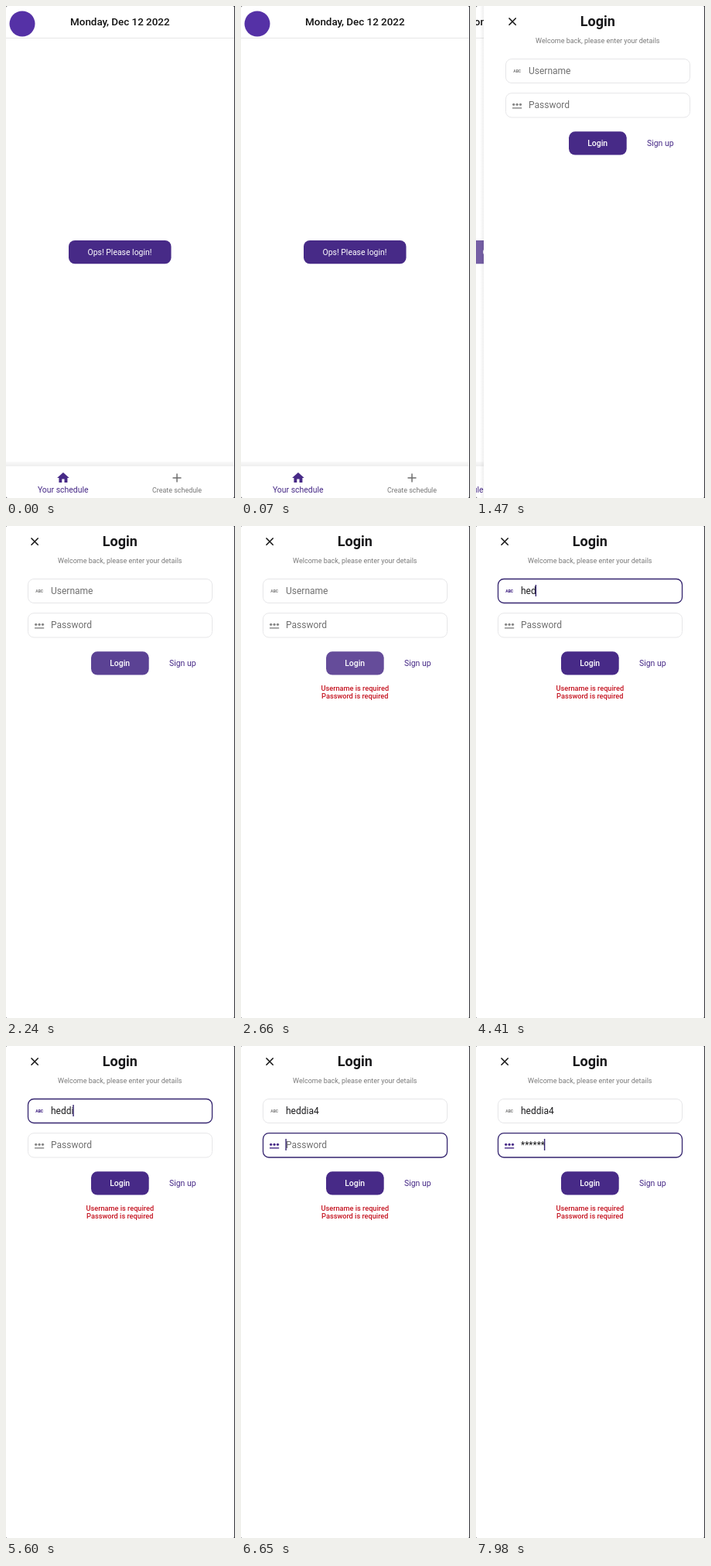
An HTML page for the animation above (8 s loop, 296 px wide and 636 px high).

```html
<!DOCTYPE html>
<html lang="en">
<head>
<meta charset="utf-8">
<title>Login form</title>
<style>
  html, body { margin: 0; width: 100%; height: 100%; overflow: hidden; background: #fff; }
  svg { display: block; width: 296px; height: 636px; }
  text { font-family: Roboto, Arial, sans-serif; }
  .mid { text-anchor: middle; }
  .semi { font-weight: 500; }
  .small { font-size: 10.45px; }
  .hint { font-size: 12px; fill: #707070; }
  .typed { font-size: 12px; fill: #1c1c1e; }
  .error { font-size: 9.2px; font-weight: 500; fill: #c4121f; }
  .box { fill: #fff; }
</style>
</head>
<body>
<svg viewBox="0 0 296 636">
  <defs>
    <linearGradient id="barShade" x2="0" y2="1">
      <stop offset="0" stop-color="#fafafa"/>
      <stop offset="1" stop-color="#eeeeee"/>
    </linearGradient>
    <linearGradient id="sideShade">
      <stop offset="0" stop-color="#000" stop-opacity="0"/>
      <stop offset="1" stop-color="#000" stop-opacity=".06"/>
    </linearGradient>
    <clipPath id="screen"><rect width="295" height="636" rx="2"/></clipPath>
  </defs>
  <rect width="296" height="636" fill="#34343a"/>
  <g clip-path="url(#screen)">
    <rect width="295" height="636" fill="#fff"/>

    <g id="home">
      <circle cx="21" cy="23" r="16.5" fill="#5531a6"/>
      <text class="mid semi" x="147.3" y="24.8" font-size="13.4" fill="#111">Monday, Dec 12 2022</text>
      <path d="M0 41.5H295" stroke="#e6e6e6"/>
      <g id="openButton">
        <rect x="81" y="303" width="132.5" height="30.3" rx="8" fill="#472a87"/>
        <text class="mid small" x="147" y="321.8" fill="#fff">Ops! Please login!</text>
      </g>
      <rect y="589" width="295" height="6" fill="url(#barShade)"/>
      <path d="M72.3 616v-4.6h3.2v4.6h3.9v-6h2.3l-7.8-7-7.8 7h2.3v6z" fill="#472a87"/>
      <text class="mid small" x="73.7" y="628.8" fill="#472a87">Your schedule</text>
      <path d="M215.5 610h11M221 604.5v11" stroke="#6e6e6e" stroke-width="1.5"/>
      <text class="mid" x="221" y="628.6" font-size="8.95" fill="#777">Create schedule</text>
    </g>

    <g id="login">
      <rect x="-5" width="5" height="636" fill="url(#sideShade)"/>
      <rect width="295" height="636" fill="#fff"/>
      <path d="M32.5 15.5l9.2 9.2M41.7 15.5l-9.2 9.2" stroke="#111" stroke-width="1.5"/>
      <text class="mid" x="147.3" y="26.2" font-size="18" font-weight="700" fill="#18181a">Login</text>
      <text class="mid" x="147.3" y="47.6" font-size="9" fill="#7a7a7a">Welcome back, please enter your details</text>

      <g id="user">
        <rect class="box" x="28.5" y="68.5" width="238" height="31" rx="7.5"/>
        <text class="icon mid" x="43.2" y="86" font-size="5" font-weight="900">ABC</text>
        <text class="hint" x="58" y="87.6">Username</text>
        <text class="typed" x="58" y="87.6"></text>
        <rect class="caret" y="76" width="1.4" height="15" fill="#35256f"/>
      </g>
      <g id="pass">
        <rect class="box" x="28.5" y="112.7" width="238" height="31.3" rx="7.5"/>
        <g class="icon">
          <circle cx="38.7" cy="127.3" r="1.6"/>
          <circle cx="43.1" cy="127.3" r="1.6"/>
          <circle cx="47.5" cy="127.3" r="1.6"/>
          <rect x="37" y="131.2" width="12.2" height="1.4"/>
        </g>
        <text class="hint" x="58" y="131.8">Password</text>
        <text class="typed" x="58" y="131.8"></text>
        <rect class="caret" y="120" width="1.4" height="15" fill="#35256f"/>
      </g>

      <g id="loginButton">
        <rect x="110" y="162.3" width="74.7" height="30.2" rx="8" fill="#472a87"/>
        <text class="mid small semi" x="147.2" y="181.2" fill="#fff">Login</text>
      </g>
      <text class="mid small" x="228.3" y="181.2" fill="#472a87">Sign up</text>
      <g id="errors">
        <text class="mid error" x="147.3" y="213">Username is required</text>
        <text class="mid error" x="147.3" y="223.2">Password is required</text>
      </g>
    </g>
  </g>
</svg>
<script>
const LOOP = 8000, STEP = 70;
const OPEN = 1470, PRESS = 2200, RELEASE = 2490, ERRORS = 2520;
const USER_FOCUS = 3290, PASS_FOCUS = 6510;
const BLINK_OFF = 3640, BLINK_ON = 4130;
const userKeys = [4130, 4270, 4410, 4830, 5040, 5740, 6230];
const passKeys = [6860, 7070, 7210, 7350, 7490, 7630];
const userName = "heddia4";

const byId = id => document.getElementById(id);
const clamp = v => Math.max(0, Math.min(1, v));
const ease = p => p < .5 ? 2 * p * p : 1 - 2 * (1 - p) ** 2;
const show = (el, on) => el.setAttribute("visibility", on ? "inherit" : "hidden");
const shift = (el, x) => el.setAttribute("transform", `translate(${x} 0)`);
const countKeys = (keys, t) => keys.filter(k => k <= t).length;

const parts = id => {
  const find = c => byId(id).querySelector("." + c);
  return { box: find("box"), icon: find("icon"), hint: find("hint"), typed: find("typed"), caret: find("caret") };
};
const user = parts("user"), pass = parts("pass");

function setField(field, text, focused, caretAlpha) {
  field.box.setAttribute("stroke", focused ? "#35256f" : "#e6e6e8");
  field.box.setAttribute("stroke-width", focused ? 1.3 : 1);
  field.icon.setAttribute("fill", focused ? "#472a87" : "#858585");
  field.typed.textContent = text;
  show(field.hint, !text);
  const width = text ? field.typed.getComputedTextLength() : 0;
  field.caret.setAttribute("x", 57.4 + width - (text ? .5 : 0));
  field.caret.setAttribute("opacity", focused ? caretAlpha : 0);
}

function pressAlpha(t) {
  const down = ease(clamp((t - PRESS) / 150));
  const up = ease(clamp((t - RELEASE) / 250));
  return 1 - .8 * down * (1 - up);
}

function draw(time) {
  const t = Math.floor(time / STEP) * STEP;
  const opened = t >= OPEN;
  const offset = t < OPEN + 2 * STEP ? 10 * Math.exp((OPEN - t) / 45) : 0;

  shift(byId("home"), opened ? -100 + offset * .3 : 0);
  byId("openButton").setAttribute("opacity", opened ? .75 : 1);
  show(byId("login"), opened);
  shift(byId("login"), opened ? offset : 0);

  byId("loginButton").setAttribute("opacity", pressAlpha(t));
  show(byId("errors"), t >= ERRORS);

  const blink = t < BLINK_ON ? 1 - clamp((t - BLINK_OFF + STEP) / (3 * STEP)) : 1;
  setField(user, userName.slice(0, countKeys(userKeys, t)), t >= USER_FOCUS && t < PASS_FOCUS, blink);
  setField(pass, "*".repeat(countKeys(passKeys, t)), t >= PASS_FOCUS, 1);
}

const start = performance.now();
function tick() {
  draw((performance.now() - start) % LOOP);
  requestAnimationFrame(tick);
}
tick();
</script>
</body>
</html>
```
